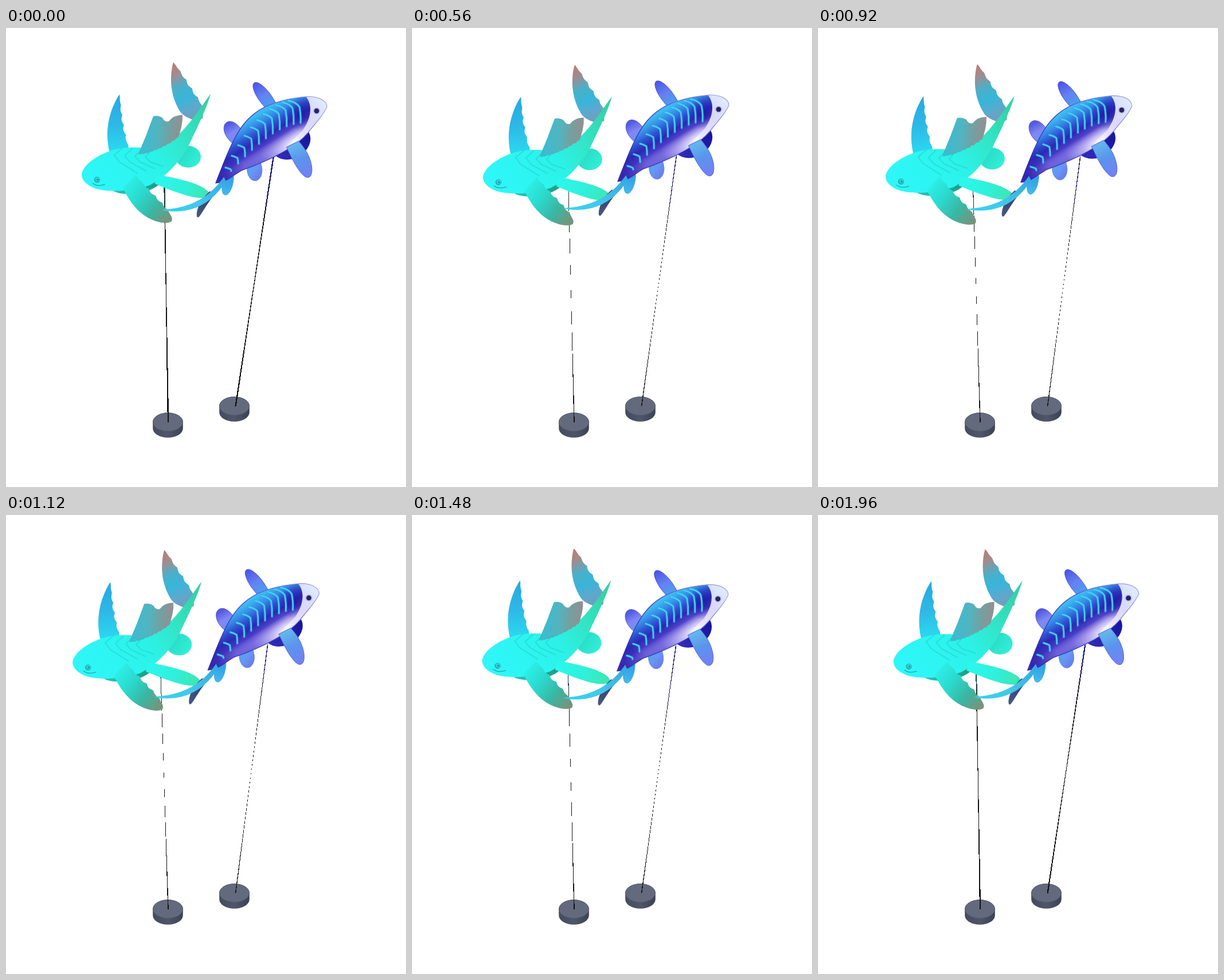
These frames come from a looping animation (698x802 px, 2000 ms). An HTML page with a canvas:

```html
<!DOCTYPE html>
<html lang="en">
<head>
<meta charset="utf-8">
<title>Two fish on stands</title>
<style>
html, body { margin: 0; width: 100%; height: 100%; overflow: hidden; background: #fff; }
canvas { display: block; width: 698px; height: 802px; }
</style>
</head>
<body>
<canvas id="stage" width="698" height="802"></canvas>
<script>
const ctx = document.getElementById('stage').getContext('2d');
const LOOP = 2000, STEP = 40, TURN = 1100;

// Sideways swing from 0 to 1 and back, gently eased at both ends
function swing(t) {
  const u = t < TURN ? t / TURN : (LOOP - t) / (LOOP - TURN);
  return (u + u * u * (3 - 2 * u)) / 2;
}

const bob = (t, mid, size, lag) => mid + size * Math.sin(t / LOOP * 2 * Math.PI - lag);

// Fin from root to tip: a bowed centre line, widest at `peak`, closing like
// a round cap (sharp .5) or a point (sharp 1); `jag` roughens one side.
function fin(x0, y0, x1, y1, half, { bow = 0, root = .85, peak = .4, sharp = .5, jag = 0 } = {}) {
  const dx = x1 - x0, dy = y1 - y0, len = Math.hypot(dx, dy);
  const nx = -dy / len, ny = dx / len, n = 48, path = new Path2D();
  const edge = (s, side) => {
    const rise = peak ? Math.sin(Math.min(s / peak, 1) * Math.PI / 2) : 1;
    const v = Math.max(0, (s - peak) / (1 - peak));
    let h = half * (root + (1 - root) * rise) * (1 - v * v) ** sharp;
    if (jag * side > 0) h -= Math.abs(jag * Math.sin(s * 19)) * Math.sin(s * Math.PI);
    const off = bow * 4 * s * (1 - s) + side * h;
    path.lineTo(x0 + dx * s + nx * off, y0 + dy * s + ny * off);
  };
  for (let i = 0; i <= n; i++) edge(i / n, 1);
  for (let i = n; i >= 0; i--) edge(i / n, -1);
  path.closePath();
  return path;
}

function oval(x, y, rx, ry, turn = 0) {
  const p = new Path2D();
  p.ellipse(x, y, rx, ry, turn, 0, 7);
  return p;
}

function shade(x0, y0, x1, y1, ...cols) {
  const g = ctx.createLinearGradient(x0, y0, x1, y1);
  cols.forEach((c, i) => g.addColorStop(i / (cols.length - 1), c));
  return g;
}

function glow(x, y, r, inner, outer) {
  const g = ctx.createRadialGradient(x, y, 0, x, y, r);
  g.addColorStop(0, inner);
  g.addColorStop(1, outer);
  ctx.fillStyle = g;
  ctx.fillRect(x - r, y - r, 2 * r, 2 * r);
}

function line(path, color, w) {
  ctx.strokeStyle = color;
  ctx.lineWidth = w;
  ctx.stroke(path);
}

function paint(path, fill, edge) {
  ctx.fillStyle = fill;
  ctx.fill(path);
  if (edge) line(path, edge, 1);
}

const dot = (x, y, r, color) => paint(oval(x, y, r, r), color);

const teal = {
  side: fin(200, 222, 198, 116, 18, { bow: -7, peak: 0, root: 1, sharp: .9, jag: 3 }),
  tail: fin(338, 160, 292, 60, 20, { bow: -7, root: .3, peak: .25, sharp: .9, jag: 3 }),
  dorsal: new Path2D('M231 220Q245 188 257 154Q266 152 273 157Q277 165 284 163Q292 152 308 152Q309 172 298 198L255 228Z'),
  stub: oval(318, 225, 22, 19),
  under: oval(226, 270, 46, 19, -.15),
  body: new Path2D('M132 257C133 240 158 222 187 213C212 206 235 208 258 212C300 200 325 160 357 115C352 135 338 165 319 205C300 240 275 262 250 275C225 284 182 288 158 281C143 276 133 268 132 257Z'),
  pelvic: fin(262, 264, 355, 292, 12, { root: .7, peak: .6 }),
  front: fin(215, 268, 289, 338, 20, { bow: 6, root: .8, peak: .45, sharp: .6, jag: -3 })
};

const blue = {
  shadow: oval(497, 200, 36, 28, -.5),
  top: fin(464, 138, 433, 96, 11),
  back: fin(405, 195, 385, 165, 14),
  belly: fin(433, 235, 435, 267, 13),
  hind: fin(390, 258, 382, 292, 9),
  front: fin(500, 203, 529, 261, 14, { bow: -2 }),
  lobe: fin(360, 288, 334, 331, 6, { bow: 3 }),
  strand: fin(382, 264, 272, 318, 5, { bow: -18, sharp: .7 }),
  body: new Path2D('M366 271C380 235 392 202 409 176C432 142 465 126 525 120C545 119 560 127 560 138C553 155 538 168 527 183C508 206 470 228 411 249C395 258 385 270 366 271Z'),
  coat: new Path2D('M490 100C540 115 538 150 517 180L450 245L350 300V100Z')
};

function tealFish() {
  const skin = shade(145, 265, 347, 140, '#2ff6f8', '#2df5f2', '#2bf2e8', '#33e5c6', '#33d3a6');
  paint(teal.side, shade(195, 118, 200, 215, '#26a9e4', '#2eb8e6', '#2bd9ef'));
  paint(teal.tail, shade(285, 62, 328, 163, '#bd7b72', '#a18c90', '#4bb0c8', '#38b5da', '#5ea8cb', '#7b98b9'));
  paint(teal.stub, shade(300, 215, 335, 240, '#28d8c4', '#32f0d8'));
  paint(teal.under, shade(190, 275, 265, 285, '#27c7b4', '#199e88'));
  paint(teal.body, skin);
  paint(teal.dorsal, shade(245, 175, 308, 180, '#40bacd', '#52b4bf', '#769f9f', '#968d92'));
  // scalloped ridge over the foot of the back fin
  for (let i = 0; i < 9; i++) dot(238 + 8 * i, 228 - 1.6 * i - .25 * i * i, 8, skin);
  for (let i = 0; i < 4; i++) {
    const p = new Path2D();
    p.moveTo(204 + 17 * i, 209 + i);
    p.lineTo(189 + 18 * i, 222 + i);
    p.lineTo(198 + 18 * i, 234);
    p.lineTo(230 + 15 * i, 254 - 4 * i);
    line(p, 'rgba(35,190,186,.4)', 2);
  }
  paint(teal.pelvic, shade(268, 265, 354, 292, '#2cf7ec', '#2ff0da', '#40e5ad'));
  paint(teal.front, shade(205, 278, 283, 336, '#2bf0e8', '#2bd9cd', '#39b7a3', '#76947c'));
  dot(159, 265, 5.2, '#23aab0');
  dot(159.5, 264.5, 3.7, '#36d6d9');
  dot(160, 265, 2, '#239fa8');
  line(new Path2D('M151 271Q160 278 173 273'), '#22afb0', 1.5);
}

function ribs() {
  ctx.lineCap = ctx.lineJoin = 'round';
  for (let i = 0; i < 11; i++) {
    const u = i / 10, x = 512 - 120 * u, y = 138 + 11 * u + 98 * u * u;
    const up = 19 - 10 * u, down = 28 - 25 * u ** 3, p = new Path2D();
    p.moveTo(x - up, y - 11 + 8 * u);
    p.quadraticCurveTo(x - 5, y - 8 + 6 * u, x, y);
    p.quadraticCurveTo(x + 3 - 2 * u, y + down / 2, x + 2 - u, y + down);
    line(p, 'rgba(50,150,240,.35)', 5);
    line(p, '#43d4f3', 2.6);
  }
}

function blueFish() {
  paint(blue.shadow, shade(475, 220, 528, 190, '#302bb8', '#1917a2'));
  paint(blue.top, shade(436, 98, 461, 138, '#4d57e8', '#6581f2', '#4a9ff0'), '#4549d5');
  paint(blue.back, shade(385, 170, 402, 199, '#535ae3', '#8088f2', '#6a91f1'), '#514bcf');
  paint(blue.belly, shade(421, 242, 443, 260, '#4aaaf0', '#6796f4', '#697cf0'), '#5b7ae5');
  paint(blue.hind, shade(389, 262, 382, 290, '#319fe6', '#42b9ec'), '#3aa9e2');
  paint(blue.lobe, shade(356, 290, 336, 328, '#353c75', '#46577f'));
  paint(blue.body, shade(380, 265, 558, 130, '#5145c5', '#5c53d2', '#7d75e4', '#d0cbf7', '#e0edff'));
  ctx.save();
  ctx.clip(blue.body);
  glow(505, 202, 65, '#fff', 'rgba(230,220,255,0)');
  ctx.save();
  ctx.clip(blue.coat);
  ctx.fillStyle = shade(431, 144, 477, 218, '#45cdf3', '#3cb4f0', '#3688e6', '#2f4fd0', '#2c29b2', 'rgba(66,54,196,.9)', 'rgba(140,120,230,.4)', 'rgba(211,195,250,0)');
  ctx.fillRect(350, 100, 200, 190);
  glow(517, 151, 30, 'rgba(31,27,164,.9)', 'rgba(36,29,173,0)');
  glow(375, 263, 48, '#3025ad', 'rgba(48,37,173,0)');
  ctx.restore();
  ribs();
  ctx.restore();
  line(blue.body, shade(368, 270, 558, 125, '#3029ad', '#3a3bc2', '#a7a4e6'), 1.2);
  paint(blue.front, shade(500, 205, 525, 255, '#63b7ed', '#5a94ec', '#7183f4'), '#525ed8');
  paint(blue.strand, shade(380, 263, 275, 320, '#36a9e1', '#44c8ea', '#30d3ef'));
  dot(542, 145, 6.2, 'rgba(170,170,222,.6)');
  dot(542, 145, 4.4, '#27235f');
}

function base(x, y) {
  ctx.fillStyle = shade(x - 26, 0, x + 26, 0, '#444b5d', '#50566a', '#3c4256');
  ctx.beginPath();
  ctx.ellipse(x, y + 11, 26.3, 16.3, 0, 0, Math.PI);
  ctx.ellipse(x, y, 26.3, 16.3, 0, Math.PI, 2 * Math.PI);
  ctx.fill();
  paint(oval(x, y, 26, 16), '#636a7d', '#555b6e');
}

// Hard-edged rod: a row shows only the pixels whose centre it covers,
// so it breaks up where it is thinner than a pixel
function rod(x0, y0, x1, y1, extra, ink) {
  ctx.fillStyle = ink;
  for (let y = Math.round(y0); y < y1; y++) {
    const x = x0 + (x1 - x0) * (y - y0) / (y1 - y0);
    const half = Math.min(2.4, .25 + Math.abs(y - 450) / 180 + extra) / 2;
    const from = Math.ceil(x - half - .5), to = Math.floor(x + half - .5);
    if (to >= from) ctx.fillRect(from, y, to - from + 1, 1);
  }
}

function placed(x, y, draw) {
  ctx.save();
  ctx.translate(x, y);
  draw();
  ctx.restore();
}

function frame(now) {
  const t = Math.floor(now % LOOP / STEP) * STEP, s = swing(t);
  const yLeft = bob(t, 1.3, 3.2, .4), yRight = bob(t, -.6, -2.3, -.2 + .4);
  const extra = Math.max(0, 1 - 8 * s);
  ctx.fillStyle = '#fff';
  ctx.fillRect(0, 0, 698, 802);
  base(398.5, 660.5);
  base(282.5, 688.5);
  rod(276.3 - 6.7 * s, 270 + yLeft, 283, 689, extra, shade(0, 276, 0, 345, '#17494a', '#111'));
  rod(466.5 - 10 * s, 226 + yRight, 400.5, 661, extra, shade(0, 230, 0, 345, '#1b1987', '#17164d', '#111'));
  placed(-16 * s, yLeft, tealFish);
  placed(-13.7 * s, yRight, blueFish);
  requestAnimationFrame(frame);
}
requestAnimationFrame(frame);
</script>
</body>
</html>
```
